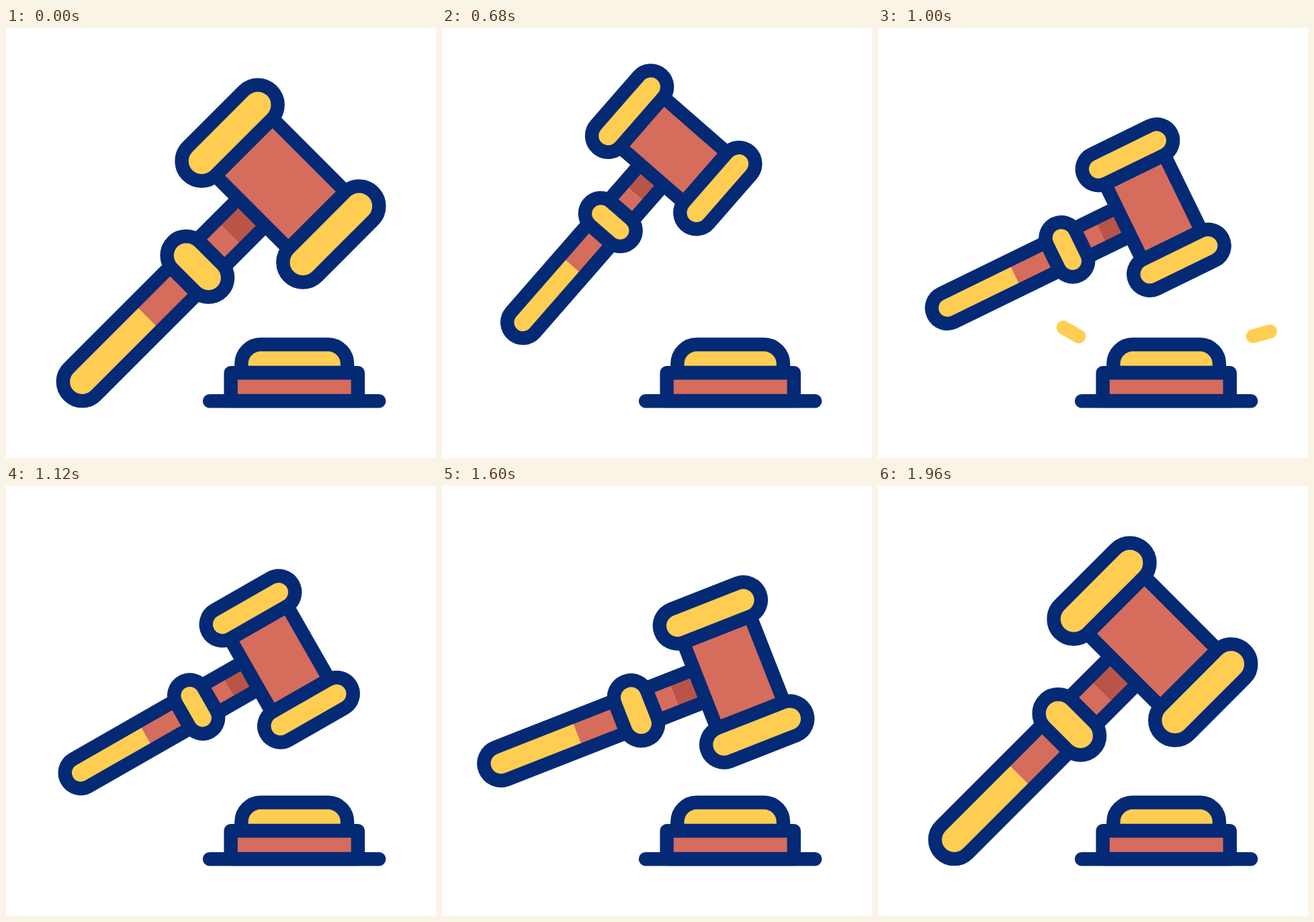
Recreate the animation shown at these times as an HTML page. Size 640x640 px, loop 2 s.

```html
<!DOCTYPE html>
<html lang="en">
<head>
<meta charset="utf-8">
<title>Gavel</title>
<style>
  html, body { margin: 0; width: 100%; height: 100%; overflow: hidden; background: #fff; }
  svg { display: block; width: 100%; height: 100%; }
  .line { stroke: #042a76; stroke-linecap: round; stroke-linejoin: round; }
  .gold { fill: #ffcd52; }
  .red { fill: #d66c5c; }
  .dark { fill: #b95448; }
  .none { fill: none; }
</style>
</head>
<body>
<svg viewBox="0 0 640 640">
  <g id="sparks" stroke="#ffcd52" stroke-width="20.4" stroke-linecap="round">
    <line/><line/>
  </g>
  <g class="line" stroke-width="20.4">
    <path class="gold" d="M350.3 513V500A29 29 0 0 1 379.3 471H479A29 29 0 0 1 508 500V513Z"/>
    <path class="red" d="M334.6 555V513.2H523.8V555Z"/>
    <path d="M303 555.2H555.2"/>
  </g>
  <!-- local origin: centre of the collar, handle to the left -->
  <g id="gavel" class="line">
    <g stroke="none">
      <path class="gold" d="M-86.5-23.4H-198a23.4 23.4 0 0 0 0 46.8H-86.5Z"/>
      <path class="red" d="M-86.5-23.4H56V23.4H-86.5Z"/>
      <path class="dark" d="M56-23.4H94V23.4H56Z"/>
    </g>
    <path class="none" d="M94-23.4H-198a23.4 23.4 0 0 0 0 46.8H94"/>
    <rect class="gold" x="-23.4" y="-42.6" width="46.8" height="85.2" rx="23.4"/>
    <rect class="red" x="93.8" y="-87" width="98.2" height="174"/>
    <rect class="gold" x="70.3" y="-111.4" width="145.2" height="48.6" rx="24.3"/>
    <rect class="gold" x="70.3" y="62.8" width="145.2" height="48.6" rx="24.3"/>
  </g>
</svg>
<script>
const LOOP = 2000, STEP = 40, STROKE = 20.4;
const gavel = document.getElementById('gavel');
const sparkLines = document.querySelectorAll('#sparks line');

// Poses: x, y, degrees raised, scale
const REST = [284.8, 355.2, 45, 1.2235];
const RAISED = [250.5, 288.6, 49.3, 1];
const HIT_1 = [279.5, 337.6, 0, 1];
const HIT_2 = [285.5, 337.6, 0, 1];

const linear = u => u;
const easeIn = u => u * u;
const smooth = u => u * u * (3 - 2 * u);

// "bulge" bends the path between two poses, strongest halfway
const moves = [
  { start: 80, end: 580, from: REST, to: RAISED, ease: smooth, bulge: [-1, -23.9, -0.1, -0.0315] },
  { start: 660, end: 880, from: RAISED, to: HIT_1, ease: easeIn, bulge: [0, 0, 0, 0] },
  { start: 880, end: 1280, from: HIT_1, to: HIT_2, ease: linear, bulge: [0, -9.4, 31, 0] },
  { start: 1320, end: 1940, from: HIT_2, to: REST, ease: smooth, bulge: [3.8, -11.2, 2.2, -0.005] }
];
const HITS = [880, 1280];

// Outer tip at full reach, and the direction back to the block
const sparks = [
  { x: 275.8, y: 445.8, dx: 0.867, dy: 0.498 },
  { x: 583.7, y: 451.7, dx: -0.963, dy: 0.266 }
];
const SPARK_LENGTH = 26.8, SPARK_SPEED = 26.3 / 80, REACH = 120, GONE = 200;

function poseAt(t) {
  let move = moves[0];
  for (const m of moves) if (t >= m.start) move = m;
  const u = Math.min(1, Math.max(0, (t - move.start) / (move.end - move.start)));
  const k = move.ease(u);
  return move.from.map((a, i) => a + (move.to[i] - a) * k + move.bulge[i] * 4 * k * (1 - k));
}

function drawSparks(t) {
  const hit = HITS.find(h => t >= h && t < h + GONE);
  sparks.forEach((s, i) => {
    const line = sparkLines[i];
    line.style.display = hit === undefined ? 'none' : '';
    if (hit === undefined) return;
    const age = t - hit;
    const near = Math.max(0, REACH - age) * SPARK_SPEED;
    const length = SPARK_LENGTH * Math.min(1, (GONE - age) / (GONE - REACH));
    const put = (n, d) => {
      line.setAttribute('x' + n, s.x + s.dx * d);
      line.setAttribute('y' + n, s.y + s.dy * d);
    };
    put(1, near);
    put(2, near + length);
  });
}

function draw(t) {
  const [x, y, angle, scale] = poseAt(t);
  gavel.setAttribute('transform', `translate(${x} ${y}) rotate(${-angle}) scale(${scale})`);
  gavel.setAttribute('stroke-width', STROKE / scale);
  drawSparks(t);
}

const began = performance.now();
function tick() {
  const t = (performance.now() - began) % LOOP;
  draw(Math.floor(t / STEP) * STEP);
  requestAnimationFrame(tick);
}
tick();
</script>
</body>
</html>
```
